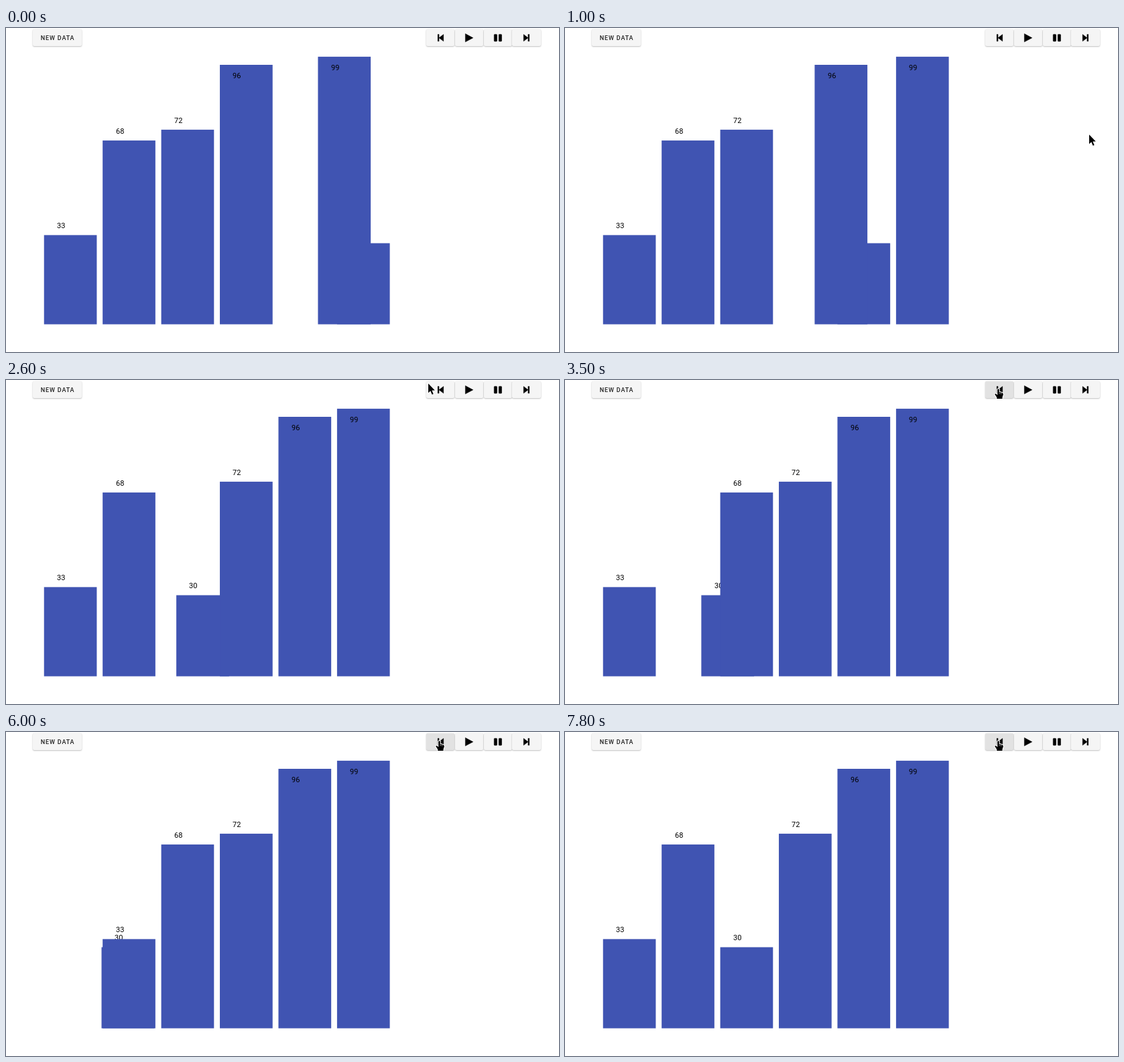
An HTML page for the animation above (8000 ms loop, 825x484 px).

```html
<!DOCTYPE html>
<html lang="en">
<head>
<meta charset="utf-8">
<title>Bar sort</title>
<style>
  html, body { margin: 0; width: 100%; height: 100%; overflow: hidden; background: #fff; }
  svg { position: absolute; left: 0; top: 0; }
  .button {
    position: absolute; top: 2.4px; height: 24.6px; width: 42.4px;
    border-radius: 2px; background: #f5f5f5;
    box-shadow: 0 .7px 2px rgba(0,0,0,.3);
  }
  text { font: 11px Roboto, sans-serif; }
  .caption { font-size: 9px; font-weight: 500; letter-spacing: .85px; fill: rgba(0,0,0,.87); }
  .icons { stroke: #000; stroke-width: .5; stroke-linejoin: round; }
  .pointer { stroke: #fff; stroke-width: 2; stroke-linejoin: round; paint-order: stroke; }
</style>
</head>
<body>
<div class="button" style="left:40px;width:73.4px"></div>
<svg id="stage" width="825" height="484" viewBox="0 0 825 484">
  <text class="caption" x="51.8" y="18">NEW DATA</text>
  <g class="icons">
    <path d="M644.2 9.6h1.8v10.2h-1.8zM652.7 9.6v10.2l-6.7-5.1z
             M685.3 8.6v12.2l11.5-6.1z
             M772.2 9.6v10.2l6.7-5.1zM778.9 9.6h1.8v10.2h-1.8z"/>
    <rect x="728.2" y="9.4" width="4.3" height="10.6" rx="1"/>
    <rect x="735.2" y="9.4" width="4.3" height="10.6" rx="1"/>
  </g>
  <g id="bars"></g>
  <path id="arrow" class="pointer" d="M0 0V14L3.2 11L5.6 16.6L7.7 15.7L5.4 10.2H9.8Z"/>
  <g id="hand">
    <path class="pointer"
          d="M-1.3 1Q0 -.6 1.3 1V5L4 5.4L6.4 6.4Q7.4 7 7.2 9L6 12.5V15H-2.3V13L-5.2 8.6Q-5 7 -3.3 7.7L-1.3 9.4Z"/>
    <path d="M1.6 5.5v2.5M4.1 6v2.3" stroke="#fff" stroke-width=".6"/>
  </g>
</svg>
<script>
const LOOP = 8000, TICK = 100;
const STEP = 87.43, BAND = STEP * .9, LEFT = 56.74, BASE = 442.6, UNIT = 4.0375;
const LABEL_INSET = 19.4;
const HOVER = 2750, PRESSES = [5450, 6750];
const values = [30, 33, 68, 72, 96, 99];

// Key points of the pointer tip: time, x, y
const pointerPath = [[700, 842, 214], [1800, 622, 13], [2400, 619, 0], [2900, 646.5, 13]];

const byId = id => document.getElementById(id);
const clamp = v => Math.max(0, Math.min(1, v));
const easeOut = u => 1 - (1 - clamp(u)) ** 3;

function add(parent, tag, attributes) {
  const node = document.createElementNS('http://www.w3.org/2000/svg', tag);
  for (const name in attributes) node.setAttribute(name, attributes[name]);
  return parent.appendChild(node);
}

for (let i = 0; i < 4; i++) {
  const button = document.createElement('div');
  button.className = 'button';
  button.style.left = 627 + i * 42.77 + 'px';
  if (i === 0) button.id = 'back';
  byId('stage').before(button);
}

// The smallest bar lies beneath the others.
const bars = values.map((value, rank) => {
  const group = add(byId('bars'), 'g', {});
  const top = BASE - value * UNIT;
  const rect = add(group, 'rect', { y: top, width: BAND, height: value * UNIT, fill: '#4054b2' });
  const label = add(group, 'text', { y: Math.round(top + (top < 80 ? 20 : -10)) });
  label.textContent = value;
  return { rect, label, home: rank - 1, moves: [] };
});
const smallest = bars[0];
smallest.home = 5;

function move(bar, from, to, start, duration) {
  bar.moves.push({ from, to, start, duration });
}

// Sorting: each larger bar steps right, then the smallest takes its slot.
for (let i = 0; i < 5; i++) {
  const slot = 4 - i, start = -156 + 1021 * i;
  move(bars[slot + 1], slot, slot + 1, start, 500);
  move(smallest, slot + 1, slot, start + 532, 500);
}

// Stepping back: the last two swaps are undone in reverse.
for (let slot = 0; slot < 2; slot++) {
  const start = 5780 + 1271 * slot;
  move(smallest, slot, slot + 1, start, 300);
  move(bars[slot + 1], slot + 1, slot, start + 400, 300);
}

function slotAt({ home, moves }, t) {
  const current = moves.filter(m => t >= m.start).pop();
  if (!current) return home;
  const { from, to, start, duration } = current;
  return from + (to - from) * easeOut((t - start) / duration);
}

function pointerAt(t) {
  let [, x, y] = pointerPath[0];
  for (let i = 1; i < pointerPath.length; i++) {
    const [t0, x0, y0] = pointerPath[i - 1], [t1, x1, y1] = pointerPath[i];
    const u = clamp((t - t0) / (t1 - t0));
    x += (x1 - x0) * u;
    y += (y1 - y0) * u;
  }
  return [x, y];
}

function buttonShade(t) {
  let shade = 245 - 19 * clamp((t - HOVER) / 250);
  for (const start of PRESSES) {
    const age = t - start;
    shade -= 12 * (clamp(age / 150) - clamp((age - 250) / 250));
  }
  return Math.round(shade);
}

function draw(t) {
  for (const bar of bars) {
    const x = LEFT + STEP * slotAt(bar, t);
    bar.rect.setAttribute('x', x);
    bar.label.setAttribute('x', Math.round(x + LABEL_INSET));
  }
  const [x, y] = pointerAt(t);
  for (const id of ['arrow', 'hand']) {
    byId(id).setAttribute('transform', `translate(${x} ${y})`);
    byId(id).style.display = (id === 'hand') === (t > HOVER) ? '' : 'none';
  }
  const shade = buttonShade(t);
  byId('back').style.background = `rgb(${shade},${shade},${shade})`;
}

const begin = performance.now();
function frame() {
  const tick = Math.floor((performance.now() - begin) % LOOP / TICK);
  draw(tick * TICK);
  requestAnimationFrame(frame);
}
frame();
</script>
</body>
</html>
```
